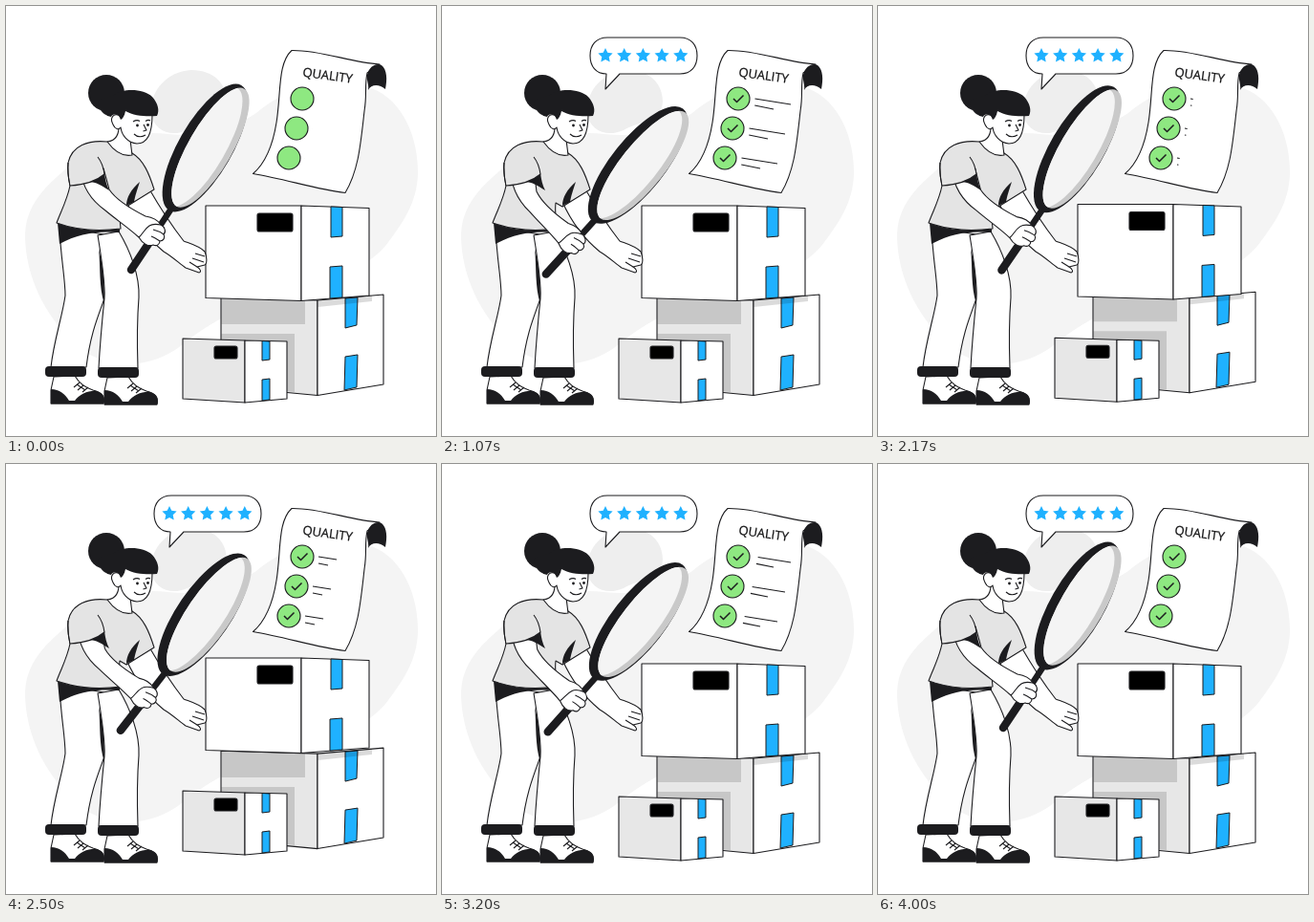
Write an HTML page that moves like this. It is 450 by 450 pixels and loops after 4.03 s.

```html
<!DOCTYPE html>
<html lang="en">
<head>
<meta charset="utf-8">
<title>Quality check</title>
<style>
  html, body { margin: 0; width: 100%; height: 100%; overflow: hidden; background: #fff; }
  svg { display: block; width: 100vw; height: 100vh; }
  .ln { fill: none; }
  .w { fill: #fff; }
  .k { fill: #1c1c1f; stroke: none; }
  .shirt { fill: #e4e4e4; }
  .tape { fill: #1fb1ff; stroke-width: 1; }
  .shade { fill: #000; fill-opacity: .14; stroke: none; }
  .pale { fill: #e7e7e7; }
  text { font: 13px "Open Sans", "Noto Sans", sans-serif; fill: #111; stroke-width: .25; }
</style>
</head>
<body>
<svg viewBox="0 0 450 450" stroke="#1c1c1f" stroke-width="1.1" stroke-linejoin="round">
  <defs>
    <clipPath id="glass"><ellipse cx="3" cy="4.500" rx="71" ry="23"/></clipPath>
    <g id="shoe">
      <path class="w" d="M50 388 L47 402 V416 H102 C104 408 99 404 91 402 C82 399 76 394 72 387Z"/>
      <path class="k" d="M47 401 C56 401 62 406 66 413 H72 C77 406 87 402 95 403 C103 405 104 411 102 416.500 H47Z"/>
      <path class="ln" d="M71 399 L77 394 M75 402 L81 397 M80 404 L86 399 M74 396 L83 402"/>
    </g>
  </defs>

  <path fill="#f4f4f4" stroke="none" d="M20 244 C19 208 42 188 68 166 C102 138 135 130 170 134
    C205 138 235 130 262 112 C292 86 340 72 382 86 C416 98 432 140 431 176 C430 206 416 226 398 250
    C372 280 330 292 290 302 C245 314 215 330 185 354 C158 376 120 382 86 364 C52 340 22 296 20 244Z"/>
  <path fill="#eee" stroke="none" d="M152 112 C150 88 170 68 194 67 C218 67 231 82 231 100
    C230 122 206 120 190 130 C172 138 154 130 152 112Z"/>

  <g id="paper">
    <path class="w" d="M299 46.500 C330 46 360 59 391 61 L378 70 C375 84 378 92 375 110
      C371 145 369 172 355 195.500 C325 192 292 181 258.500 175.500 C272 164 279 147 283 122 C288 92 284 60 299 46.500Z"/>
    <path class="k" d="M378 72 C380 63 388 59 393 62 C399 67 399 77 397 87 C390 81 382 82 379 88 C380 82 377 78 378 72Z"/>
    <text x="310" y="73.500" transform="rotate(8 310 73.500)">QUALITY</text>
  </g>

  <g id="midBox">
    <path class="pale" d="M225 305 L326 308 V407.500 L225 398Z"/>
    <path class="w" d="M326 308 L395 302 V396 L326 407.500Z"/>
    <path class="tape" d="M355 306 L368 305 L367 334 L355 337Z M355 367 L368 365 L367 399 L354 402Z"/>
    <path class="shade" d="M225.500 305 H313 V333 H225.500Z M225.500 343 H302 V404 L225.500 397Z M326.500 308 L383 303 V309 L326.500 315Z"/>
  </g>
  <g id="topBox">
    <path class="w" d="M209 209 H309 V308.500 L209 305.500Z"/>
    <path class="w" d="M309 209 L380 211.500 L380 303 L309 308.500Z"/>
    <rect x="263" y="217" width="37" height="19" rx="2" fill="#000"/>
    <path class="tape" d="M340 210 L352 210.500 V241 L340 242Z M339 273 L352 272 V305 L339 306Z"/>
  </g>
  <g id="smallBox">
    <path class="pale" d="M185 348 L250 350 V415 L185 411Z"/>
    <path class="w" d="M250 350 L294 351 V411 L250 415Z"/>
    <rect x="218" y="356" width="24" height="13" rx="2" fill="#000"/>
    <path class="tape" d="M268 350.500 L276 351 V370 L268 371Z M268 391 L276 390 V412 L268 413Z"/>
  </g>

  <g id="bubble">
    <path class="w" d="M173 33 H249 C261 33 267 41 267 52 C267 63 261 71 249 71 H186 L171 87 L172 71
      C161 71 155 63 155 52 C155 41 161 33 173 33Z"/>
  </g>

  <!-- back arm -->
  <path class="w" d="M126 205 C135 225 148 243 165 257 C175 263 182 270 188 274 L202 279 C205 278 203 275 200 273
    L208 271 C211 269 210 262 208 257 C202 251 194 249 186 246 C175 232 164 216 149 190Z"/>
  <path class="ln" d="M208 262 L198 259 M207 268 L195 264 M200 273 L192 268"/>

  <!-- legs -->
  <path class="w" d="M56 231 C57 262 62 285 62 303 C59 325 50 350 47 378 H84 C88 345 95 328 103 306 L108 240Z"/>
  <path class="w" d="M96 240 C101 270 104 290 103 306 C100 335 98 360 97 379 H138 C137 350 137 330 139 305
    C140 282 130 256 118 236Z"/>
  <path class="k" d="M54 227 C75 235 97 236 119 233 V237 C95 235 76 238 56 249Z M97 254 C102 272 103 290 103 312 C97 294 99 272 97 254Z"/>
  <use href="#shoe"/>
  <use href="#shoe" x="56" y="1"/>
  <rect class="k" x="41" y="377" width="43" height="11" rx="4"/>
  <rect class="k" x="96" y="378" width="43" height="11" rx="4"/>

  <!-- neck and shirt -->
  <path class="shirt" d="M106 142 C86 140 69 146 65 164 C64 175 66 183 67 188 C64 203 57 216 53 227
    C75 235 97 236 120 233 C119 222 118 214 119 206 L126 210 L155 192 C150 176 144 161 132 154Z"/>
  <path class="k" d="M126 209 C126 200 131 192 140 184 C137 193 135 199 134 205Z"/>
  <path class="w" d="M118 122 C119 134 115 141 106 142 C114 153 122 158 132 156 L130 140Z"/>

  <!-- head -->
  <path class="w" d="M124 108 L121 116 C113 110 108 117 112 124 C114 129 118 130 120 127 C121 135 127 143 137 144
    C148 144 153 134 153 114Z"/>
  <circle class="k" cx="105" cy="91" r="19"/>
  <path class="k" d="M113 93 C122 86 144 86 153 95 C159 102 161 109 158 115 C147 116 134 115 125 110
    C124 115 122 118 120 119 C118 112 112 112 110 116 C100 114 94 104 98 98Z"/>
  <path class="ln" d="M133 121 Q137 118.500 140 120.500 M146 120.500 Q149 118.500 151 120 M144 124 L147 130 L143.500 131 M134 134 Q139 139 146 135"/>
  <g id="eyesOpen" class="k"><circle cx="137.500" cy="125" r="1.400"/><circle cx="148.500" cy="124.500" r="1.400"/></g>
  <path id="eyesShut" class="ln" d="M134.500 124.500 Q137.500 127 140.500 125 M146.500 124.500 Q149 126.500 151 124"/>

  <!-- front arm with magnifier -->
  <g id="arm">
    <path d="M131 276 L149 249" stroke-width="8.500" stroke-linecap="round"/>
    <path d="M148 250 L173 212" stroke-width="6.500"/>
    <g transform="translate(208.500 148.500) rotate(-60)">
      <ellipse class="k" rx="75.500" ry="28"/>
      <ellipse cx="3" cy="4.500" rx="71" ry="23" fill="#c9c9c9" stroke="none"/>
      <ellipse cy="-2" rx="71" ry="23" fill="#f4f4f4" stroke="none" clip-path="url(#glass)"/>
    </g>
    <path class="w" d="M78 172 C80 190 90 204 104 214 C116 224 128 232 139 242 C143 249 149 252 154 250
      C158 252 161 249 161 246 C165 246 167 242 165 239 C168 236 166 231 162 229 C159 224 153 221 146 220
      C132 213 116 204 108 192 L102 170Z"/>
    <path class="ln" d="M161 246 C158 244 155 242 152 241 M165 239 C161 236 158 235 154 234 M139 242 C143 239 144 234 150 230 C153 228 157 228 162 229"/>
  </g>
  <path class="k" d="M86 182 L103 175 C104 182 105 187 108 193 C100 188 95 184 86 184Z"/>
  <path class="shirt" stroke="none" d="M84 150 C70 154 66 166 66 176 L67 188 C84 187 96 182 103 176 L97 157Z"/>
  <path class="ln" d="M65 164 C64 175 66 183 67 188 C84 187 96 182 103 176 C102 169 100 163 96 158"/>
</svg>
<script>
const LOOP = 4030, HALF = 2000;
const $ = id => document.getElementById(id);
const ease = p => (1 - Math.cos(Math.PI * Math.min(1, Math.max(0, p)))) / 2;

function add(parent, tag, attrs) {
  const el = document.createElementNS("http://www.w3.org/2000/svg", tag);
  for (const k in attrs) el.setAttribute(k, attrs[k]);
  return parent.appendChild(el);
}

const starPath = Array.from({ length: 10 }, (_, i) => {
  const r = i % 2 ? 3.9 : 8, a = (i / 5 - 0.5) * Math.PI;
  return (r * Math.cos(a)).toFixed(2) + " " + (r * Math.sin(a)).toFixed(2);
}).join("L");
for (let i = 0; i < 5; i++) {
  add($("bubble"), "path", {
    d: `M${starPath}Z`, fill: "#1fb1ff", stroke: "none",
    transform: `translate(${171 + i * 19.7} 52)`
  });
}

const ticks = [], lines = [];
for (const [x, y] of [[310, 97], [304, 128], [296, 159]]) {
  const row = add($("paper"), "g", { transform: `translate(${x} ${y})` });
  add(row, "circle", { r: 12, fill: "#8ee881" });
  ticks.push(add(row, "path", {
    d: "M-5 0L-1.500 3.500L5.500 -3.500", class: "ln", "stroke-width": 1.5,
    pathLength: 1, "stroke-dasharray": "1 2"
  }));
  for (const [lx, ly, dx, dy] of [[17, 0, 38, 6], [17, 7, 20, 4]]) {
    lines.push({ el: add(row, "line", {}), lx, ly, dx, dy });
  }
}

// time, scale, angle of the speech bubble
const POP = [[0, 0, -20], [310, 1.18, -15], [530, 1.08, -10], [820, 0.99, 1], [1070, 1, 0]];
function popAt(t) {
  const i = POP.findIndex(k => k[0] > t);
  if (i < 0) return [1, 0];
  const a = POP[i - 1], b = POP[i], p = ease((t - a[0]) / (b[0] - a[0]));
  return [1, 2].map(j => a[j] + (b[j] - a[j]) * p);
}

const hop = (u, span) => u < span ? Math.sin(Math.PI * u / span) : 0;
const lift = (id, dy) => $(id).setAttribute("transform", `translate(0 ${-dy})`);

function draw(t) {
  const u = t % HALF;
  const grow = ease(u / 1000), wipe = ease((u - 1000) / 1000);

  $("arm").setAttribute("transform", `rotate(${8.9 * (grow - wipe)} 90 134)`);
  for (const { el, lx, ly, dx, dy } of lines) {
    el.setAttribute("x1", lx + dx * wipe);
    el.setAttribute("y1", ly + dy * wipe);
    el.setAttribute("x2", lx + dx * grow);
    el.setAttribute("y2", ly + dy * grow);
  }
  ticks.forEach((el, i) => {
    const p = ease((t - 40 - i * 50) / 330);
    el.setAttribute("stroke-dashoffset", 1 - p);
    el.style.visibility = p > 0 ? "visible" : "hidden";
  });

  lift("midBox", 5 * hop(u, 900));
  lift("topBox", 6 * hop(u, 1000) ** 2);
  lift("smallBox", 6 * hop(u, 1000) ** 3);

  const [s, r] = popAt(t);
  $("bubble").setAttribute("transform", `translate(171 87) rotate(${r}) scale(${s}) translate(-171 -87)`);
  $("bubble").style.visibility = s > 0 ? "visible" : "hidden";

  const shut = t > 3450 && t < 3620;
  $("eyesOpen").style.visibility = shut ? "hidden" : "visible";
  $("eyesShut").style.visibility = shut ? "visible" : "hidden";
}

const start = performance.now();
function tick() {
  draw(Math.min((performance.now() - start) % LOOP, 2 * HALF - 0.01));
  requestAnimationFrame(tick);
}
draw(0);
requestAnimationFrame(tick);
</script>
</body>
</html>
```
